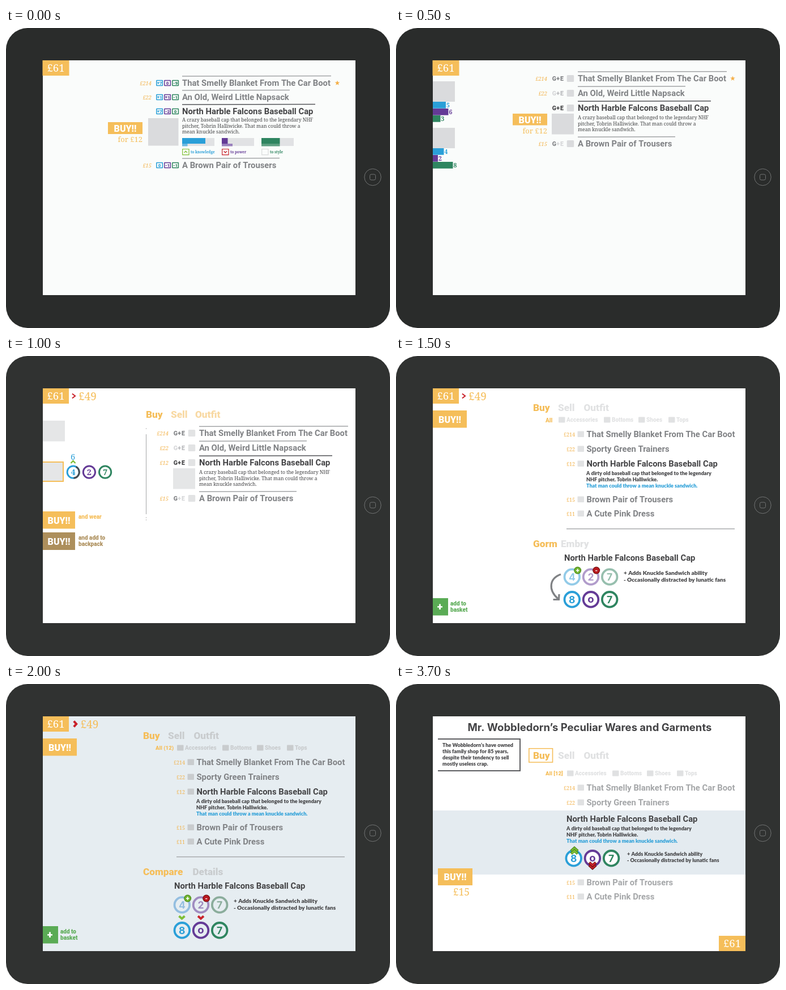
Animation of 678 by 529 pixels, one loop 4500 ms. Source, as an HTML page with a canvas:

```html
<!DOCTYPE html>
<html lang="en">
<head>
<meta charset="utf-8">
<title>Shop screen</title>
<style>
html, body { margin: 0; width: 100%; height: 100%; overflow: hidden; background: #fff; }
canvas { display: block; width: 678px; height: 529px; }
</style>
</head>
<body>
<canvas id="stage" width="678" height="529"></canvas>
<script>
const g = document.getElementById('stage').getContext('2d');
const LOOP = 4500, STEP = 500, LAST = 5;

const ORANGE = '#f5be5a', BLUE = '#2a9fd8', PURPLE = '#643a96', GREEN = '#2f8560';
const DARK = '#434345', MID = '#808285', PALE = '#dadbdd', RED = '#c9222a', LIME = '#7fbf35';
const STATS = [BLUE, PURPLE, GREEN];

const HEAD = ['700', 'Roboto, sans-serif'];
const BLACK = ['900', 'Roboto, sans-serif'];
const BODY = ['900', 'Lato, sans-serif'];
const SLAB = ['500', '"Noto Serif", serif'];
const SLABB = ['700', '"Noto Serif", serif'];
const ITALIC = ['italic 500', '"Noto Serif", serif'];
const ROUND = ['700', 'Inter, sans-serif'];

const TEAM_CAP = 'North Harble Falcons Baseball Cap';
const BLANKET = 'That Smelly Blanket From The Car Boot';
const CRAZY = ['A crazy baseball cap that belonged to the legendary NHF',
  'pitcher, Tobrin Halliwicke. That man could throw a', 'mean knuckle sandwich.'];
const DIRTY = ['A dirty old baseball cap that belonged to the legendary',
  'NHF pitcher, Tobrin Halliwicke.', 'That man could throw a mean knuckle sandwich.'];

function text(s, x, y, font, size, color, align = 'left') {
  g.font = `${font[0]} ${size}px ${font[1]}`;
  g.textAlign = align;
  g.fillStyle = color;
  g.fillText(s, x, y + size * 0.36);
}

// Corner to corner
function box(x1, y1, x2, y2, color, r = 0) {
  g.fillStyle = color;
  g.beginPath();
  g.roundRect(x1, y1, x2 - x1, y2 - y1, r);
  g.fill();
}

function frame(x1, y1, x2, y2, color, width, r = 0) {
  g.strokeStyle = color;
  g.lineWidth = width;
  g.beginPath();
  g.roundRect(x1, y1, x2 - x1, y2 - y1, r);
  g.stroke();
}

function line(points, color, width) {
  g.strokeStyle = color;
  g.lineWidth = width;
  g.beginPath();
  points.forEach(([x, y]) => g.lineTo(x, y));
  g.stroke();
}

function disc(x, y, r, color) {
  g.fillStyle = color;
  g.beginPath();
  g.arc(x, y, r, 0, Math.PI * 2);
  g.fill();
}

function ring(x, y, r, color, width, from = 0, to = Math.PI * 2) {
  g.strokeStyle = color;
  g.lineWidth = width;
  g.beginPath();
  g.arc(x, y, r, from, to);
  g.stroke();
}

function chevron(x, y, w, h, color, width, turn = 0) {
  g.save();
  g.translate(x, y);
  g.rotate(turn * Math.PI / 2);
  line([[-w, h], [0, -h], [w, h]], color, width);
  g.restore();
}

function star(x, y, r) {
  g.fillStyle = '#f5b04a';
  g.beginPath();
  for (let i = 0; i < 10; i++) {
    const a = i * Math.PI / 5 - Math.PI / 2, d = i % 2 ? r * 0.42 : r;
    g.lineTo(x + d * Math.cos(a), y + d * Math.sin(a));
  }
  g.fill();
}

function tablet(body, screen) {
  g.fillStyle = '#fff';
  g.fillRect(0, 0, 678, 529);
  box(0, 0, 678, 529, body, 38);
  ring(647.5, 263, 14.7, '#717373', 1);
  frame(642.5, 258, 652.5, 268, '#717373', 1, 2.5);
  box(65, 57, 617, 471, screen);
}

function tag(x, y, right, bottom) {
  box(x, y, right, bottom, ORANGE);
  text('£61', (x + right) / 2, (y + bottom) / 2, SLAB, 18.5, '#fff', 'center');
}

function buy(x1, y1, x2, y2, color = ORANGE) {
  box(x1, y1, x2, y2, color);
  text('BUY!!', (x1 + x2) / 2, (y1 + y2) / 2 + 0.5, BLACK, 16, '#fff', 'center');
}

function paragraph(lines, x, y, step, font, size, color) {
  lines.forEach((s, i) => text(s, x, y + i * step, font, size, color));
}

const title = (s, x, y, color) => text(s, x, y, HEAD, 14.8, color);
const label = (s, x, y, color, size = 10) => text(s, x, y, BLACK, size, color);
const tab = (s, x, y, color) => text(s, x, y, BLACK, 17.2, color);

// Early list: ruled rows
function ruledList(x, ys, gap, cap) {
  const names = [BLANKET, 'An Old, Weird Little Napsack', TEAM_CAP, 'A Brown Pair of Trousers'];
  const widths = [263, 190, 235, 172], prices = ['£214', '£22', cap, '£15'];
  names.forEach((s, i) => {
    const on = i === 2;
    line([[x, ys[i] - gap + 0.5], [x + widths[i], ys[i] - gap]], on ? '#55565a' : '#a3a5a7', 1.4);
    title(s, x, ys[i], on ? DARK : MID);
    text(prices[i], x - 54, ys[i] + 0.5, ITALIC, 9.3, '#f2b24b', 'right');
  });
}

function initials(x, ys, tone) {
  const faint = '#d5d6d8';
  const tones = [[MID, MID], [faint, '#b9babd'], [DARK, DARK], [MID, faint]];
  ys.forEach((y, i) => {
    const [a, b] = tones[i];
    label('G', x, y, a, 10.5);
    label('+', x + 7.6, y, b, 10.5);
    label('E', x + 14.4, y, b, 10.5);
    box(x + 26, y - 6, x + 38.5, y + 6, tone, 1.5);
  });
}

function statBoxes(y, values) {
  values.forEach((v, i) => {
    const x = 265 + i * 14;
    frame(x + 0.8, y - 4.5, x + 11.4, y + 4.5, STATS[i], 1.5, 0.5);
    text(v, x + 6.1, y, BLACK, 8, STATS[i], 'center');
  });
}

function meter(x, top, low, color, soft) {
  box(x, 194, x + 57, 208, '#e1e2e4');
  box(x, 194, x + top, 204, color);
  box(x, 204, x + low, 208.5, soft);
}

function effect(x, color, turn, s, ink) {
  frame(x + 0.7, 213.5, x + 12, 223.7, color, 1.2);
  if (turn !== null) chevron(x + 6.3, 218.5, 2.6, 1.5, color, 1.2, turn);
  text(s, x + 15, 218.5, SLABB, 6.3, ink);
}

function sceneBars() {
  tablet('#2a2c2b', '#fafcfb');
  tag(64.5, 57, 111.5, 84);
  const ys = [97, 122, 147, 242];
  ruledList(311, ys, 12.5, '');
  star(585, 97, 4.6);
  [['+7', '0', '-9'], ['+1', '+1', '-1'], ['+7', '-2', '0'], ['0', '-1', '-1']]
    .forEach((v, i) => statBoxes(ys[i], v));
  buy(180, 166, 241, 187);
  text('for £12', 241, 196, SLAB, 13, ORANGE, 'right');
  box(251, 159, 304.5, 207.5, PALE);
  paragraph(CRAZY, 311, 162, 10.5, SLAB, 8.6, DARK);
  meter(311, 41, 9.5, BLUE, '#6cb9e1');
  meter(381, 10.5, 19, PURPLE, '#9a80bd');
  meter(451, 32.5, 32.5, GREEN, '#5f9f82');
  effect(311, LIME, 0, 'to knowledge', BLUE);
  effect(381, RED, 2, 'to power', PURPLE);
  effect(451, '#d9dadb', null, 'to style', GREEN);
}

function bust(y, rows) {
  box(65, y, 104, y + 36, PALE);
  rows.forEach(([w, n], i) => {
    const top = y + 36 + i * 12;
    box(65, top, 65 + w, top + 11.7, STATS[i]);
    text(n, 66 + w, top + 6.5, SLABB, 10.5, STATS[i]);
  });
}

function sceneBusts() {
  tablet('#2a2c2b', '#fafcfb');
  tag(64.5, 57, 111.5, 84);
  bust(94, [[23, '5'], [27.5, '6'], [13.5, '3']]);
  bust(176, [[19.5, '4'], [9, '2'], [35.5, '8']]);
  const ys = [89, 115, 141, 204];
  ruledList(321, ys, 12.2, '');
  initials(275.7, ys, PALE);
  star(594.5, 89, 4.6);
  buy(206, 151, 267, 171.5);
  text('for £12', 267, 181.5, SLAB, 13, ORANGE, 'right');
  box(275, 151, 314, 187.5, PALE);
  paragraph(CRAZY, 321, 158, 10.5, SLAB, 8.6, DARK);
}

function purse(x, wide) {
  tag(65, 57, 111, 84);
  chevron(x, 70.5, wide ? 5 : 4, wide ? 2.2 : 2.6, RED, wide ? 4 : 2, 1);
  text('£49', x + (wide ? 9.5 : 8.5), 71, SLAB, 19, ORANGE);
}

function sceneTabs() {
  tablet('#303231', '#fff');
  purse(119.5, false);
  box(65, 114, 104, 150.5, '#e5e6e7');
  box(65, 186, 102, 222, ORANGE);
  box(65, 188, 100, 220, '#e5e6e7');
  text('6', 118, 177.5, SLAB, 14.5, BLUE, 'center');
  chevron(118.5, 187, 4, 2, LIME, 2.4);
  ['4', '2', '7'].forEach((n, i) => {
    const x = 118.7 + i * 28.2;
    ring(x, 204.7, 10.6, STATS[i], 3);
    if (!i) ring(x, 204.7, 10.6, '#4a4c50', 3, -1.1, 1.5);
    text(n, x, 204.7, SLABB, 14, STATS[i], 'center');
  });
  buy(65, 274, 122, 304.5);
  label('and wear', 128, 283.5, ORANGE);
  buy(65, 311, 122, 342, '#ad8f5c');
  label('and add to', 128, 320.5, '#ad8f5c');
  label('backpack', 128, 331.5, '#ad8f5c');
  tab('Buy', 247, 102.5, ORANGE);
  tab('Sell', 291, 102.5, '#f8d9a3');
  tab('Outfit', 334, 102.5, '#f8d9a3');
  line([[247.5, 138], [247.5, 279]], '#a5a6a8', 1);
  g.setLineDash([2, 2]);
  line([[247.5, 127], [247.5, 131]], '#bbb', 1);
  line([[247.5, 284], [247.5, 290]], '#bbb', 1);
  g.setLineDash([]);
  const ys = [136, 162, 188, 251];
  ruledList(341, ys, 12.2, '£12');
  initials(295.7, ys, '#e2e3e4');
  box(295, 198, 334, 234.5, '#e5e6e7');
  paragraph(CRAZY, 341, 205, 10.5, SLAB, 8.6, DARK);
}

function shopTabs(y, tone) {
  tab('Buy', 242, y, ORANGE);
  tab('Sell', 286, y, tone);
  tab('Outfit', 331.5, y, tone);
}

function filters(y, all, x, tone) {
  label(all, 264, y + 0.5, ORANGE, all.length > 3 ? 9.6 : 10);
  [['Accessories', 0], ['Bottoms', 80], ['Shoes', 141], ['Tops', 194]].forEach(([s, dx]) => {
    box(x + dx, y - 5, x + dx + 11.5, y + 5, tone, 1);
    label(s, x + dx + 14, y, tone);
  });
}

function plainRow(s, price, y, color, tone) {
  text(price, 316, y + 0.3, SLAB, 9, '#f2b24b', 'right');
  box(320.5, y - 5.5, 332, y + 5, tone, 1);
  title(s, 336.5, y, color);
}

function blurb(x, y) {
  paragraph(DIRTY.slice(0, 2), x, y, 11, BODY, 9, DARK);
  text(DIRTY[2], x, y + 22, BODY, 9, BLUE);
}

function perks(x, y, step, size) {
  paragraph(['+ Adds Knuckle Sandwich ability', '- Occasionally distracted by lunatic fans'],
    x, y, step, BODY, size, DARK);
}

// Zero is set low, like an old-style figure
function scores(x, y, values, colors) {
  values.forEach((n, i) => {
    const cx = x + i * 33.2;
    ring(cx, y, 13.3, colors[i], 3.8);
    if (n === '0') text('o', cx, y - 1, ROUND, 18.5, colors[i], 'center');
    else text(n, cx, y, ROUND, 17.5, colors[i], 'center');
  });
}

function badge(x, y, color, edge, sign) {
  disc(x, y, 6.5, edge);
  disc(x, y, 5.4, color);
  text(sign, x, y, BLACK, 11, '#fff', 'center');
}

function basket() {
  box(65, 427, 92, 457.5, '#5aab55');
  text('+', 77.5, 442, BLACK, 18, '#fff', 'center');
  label('add to', 96, 436.5, '#5aab55');
  label('basket', 96, 447.5, '#5aab55');
}

function curvedArrow() {
  g.strokeStyle = MID;
  g.lineWidth = 3.2;
  g.beginPath();
  g.moveTo(291, 385);
  g.bezierCurveTo(271, 392, 268, 412, 286, 428);
  g.stroke();
  line([[288, 420], [287.5, 429.5], [277.5, 429.5]], MID, 3.2);
}

function basketShop({ screen, tone, wide, all, filterX, tabs, tabX, faded, lowY }) {
  tablet('#303231', screen);
  purse(wide ? 122 : 119.5, wide);
  buy(65, 96, 125, 126.5);
  shopTabs(90.5, tone);
  filters(112.5, all, filterX, tone);
  plainRow(BLANKET, '£214', 138, MID, tone);
  plainRow('Sporty Green Trainers', '£22', 164, MID, tone);
  plainRow(TEAM_CAP, '£12', 190, DARK, tone);
  blurb(336, 207);
  plainRow('Brown Pair of Trousers', '£15', 253, MID, tone);
  plainRow('A Cute Pink Dress', '£11', 278, MID, tone);
  line([[301, 304.7], [598, 304.7]], '#a9abae', 1.4);
  tab(tabs[0], 242, 331, ORANGE);
  tab(tabs[1], tabX, 331, tone);
  title(TEAM_CAP, 297, 356, DARK);
  scores(310.8, 389.5, ['4', '2', '7'], faded);
  badge(320.7, 378, '#6fb22c', '#4c8a1f', '+');
  badge(353.7, 378, '#b8181e', '#6d1013', '-');
  scores(310.8, lowY, ['8', '0', '7'], STATS);
  perks(402, 382.5, 12, 10.1);
  basket();
}

function sceneBasket() {
  basketShop({
    screen: '#fff', tone: '#e1e2e3', wide: false, all: 'All', filterX: 287,
    tabs: ['Gorm', 'Embry'], tabX: 291, faded: ['#93cbe8', '#b19ccb', '#97bfae'], lowY: 429.3
  });
  curvedArrow();
}

function sceneCompare() {
  basketShop({
    screen: '#e6edf1', tone: '#c9ccce', wide: true, all: 'All (12)', filterX: 302,
    tabs: ['Compare', 'Details'], tabX: 329.5, faded: ['#94bee0', '#9f8bc0', '#8bad9c'], lowY: 434.3
  });
  chevron(310.5, 411.5, 5, 2.2, LIME, 4, 2);
  chevron(344, 411.5, 5, 2.2, RED, 4, 2);
}

function doubleChevron(x, y, dark, light, turn) {
  const s = turn ? 1 : -1;
  for (const dy of [0, -4.5 * s]) {
    chevron(x, y + dy, 5.8, 2.6, dark, 5, turn);
    chevron(x, y + dy, 5, 2.2, light, 3, turn);
  }
}

function sceneStore() {
  const tone = '#e0e1e2', soft = '#a5a7a9';
  tablet('#303231', '#fff');
  box(65, 223, 617, 336, '#e4ebf0');
  text('Mr. Wobbledorn’s Peculiar Wares and Garments', 342, 76, ROUND, 18.5, DARK, 'center');
  line([[74, 97], [219, 97], [219, 153], [74, 153]], '#5c5d60', 2);
  paragraph(['The Wobbledorn’s have owned', 'this family shop for 85 years,',
    'despite their tendency to sell', 'mostly useless crap.'], 82, 108, 11, BODY, 9, DARK);
  frame(234.8, 113.8, 276.5, 138, ORANGE, 1.6);
  shopTabs(126, tone);
  filters(157.5, 'All [12]', 302, tone);
  plainRow(BLANKET, '£214', 183, soft, tone);
  plainRow('Sporty Green Trainers', '£22', 209, soft, tone);
  title(TEAM_CAP, 301, 238, DARK);
  blurb(301, 255);
  for (let i = 0; i < 3; i++) disc(313.7 + i * 33.2, 307.3, 13, '#fff');
  scores(313.7, 307.3, ['8', '0', '7'], STATS);
  doubleChevron(315, 292, '#4c8a1f', LIME, 0);
  doubleChevron(347, 322, '#6d1013', RED, 2);
  perks(408, 300, 11, 9.1);
  plainRow('Brown Pair of Trousers', '£15', 350, soft, tone);
  plainRow('A Cute Pink Dress', '£11', 375, soft, tone);
  buy(74, 325, 135, 355);
  text('£15', 130, 366.5, SLAB, 17.5, ORANGE, 'right');
  tag(570, 444, 617, 471);
}

const scenes = [sceneBars, sceneBusts, sceneTabs, sceneBasket, sceneCompare, sceneStore];
const start = performance.now();

function draw() {
  const t = (performance.now() - start) % LOOP;
  scenes[Math.min(LAST, Math.floor(t / STEP))]();
  requestAnimationFrame(draw);
}
draw();
</script>
</body>
</html>
```
